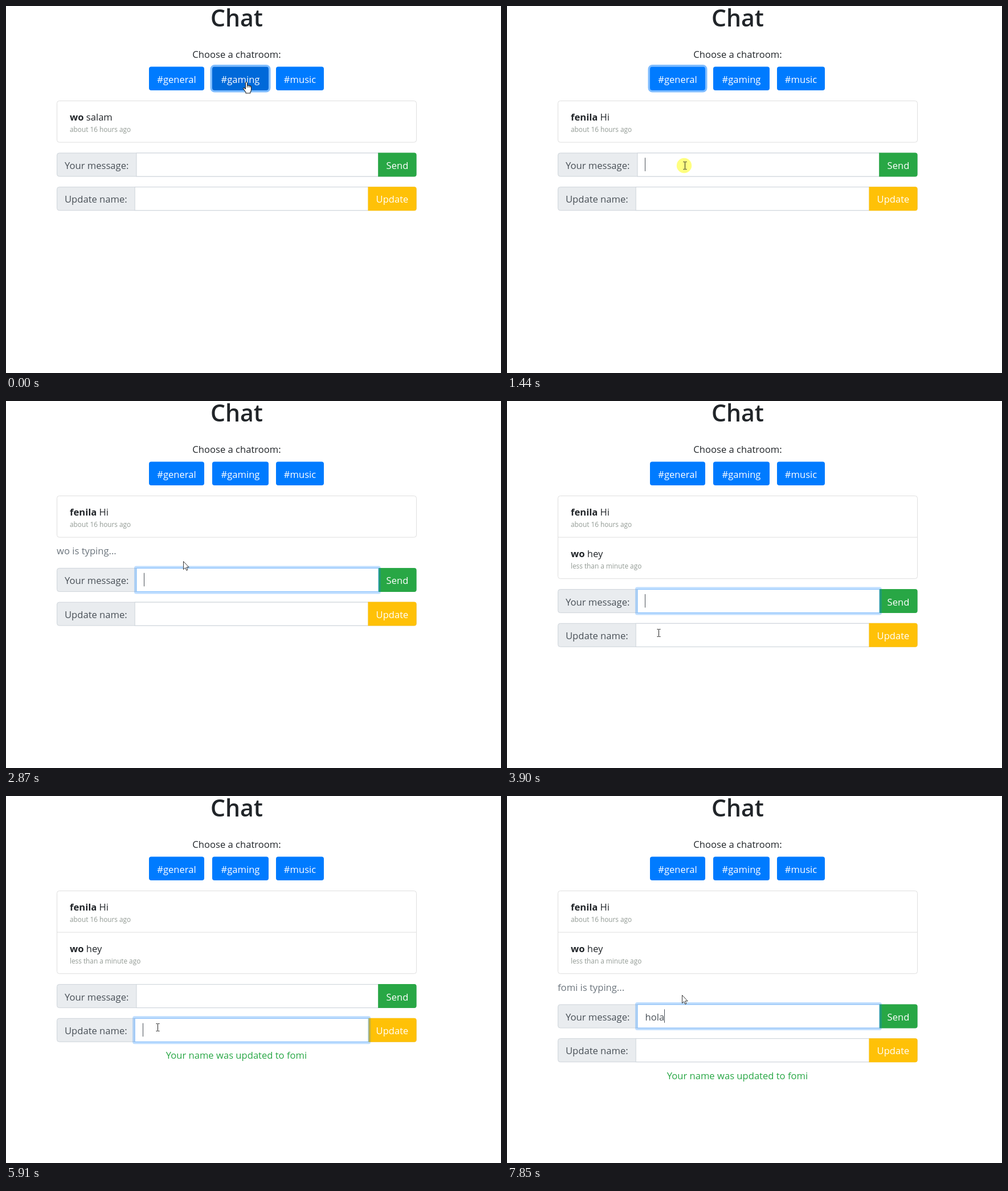
Recreate the animation shown at these times as an HTML page. Size 869 by 644 pixels, loop 8000 ms.

```html
<!DOCTYPE html>
<html lang="en">
<head>
<meta charset="utf-8">
<title>Chat</title>
<style>
  html, body { margin: 0; width: 100%; height: 100%; overflow: hidden; background: #fff; }
  svg { display: block; width: 869px; height: 644px; }
  text { font: 16.6px "Open Sans", "Noto Sans", sans-serif; fill: #212529; white-space: pre; }
  .mid { text-anchor: middle; }
  .light { fill: #fff; }
  .field { fill: #495057; }
  .muted { fill: #6c757d; }
  .small { font-size: 11.8px; fill: #929a94; }
  .bold { font-weight: 700; }
  .title { font-size: 41px; font-weight: 600; }
  .ok { fill: #28a745; }
  .card { fill: #fff; stroke: #dfdfdf; }
  .group { fill: #e9ecef; stroke: #ced4da; }
  .input { fill: #fff; stroke: #ced4da; }
  .active { fill: #fff; stroke: #80bdff; }
  .glow { fill: none; stroke: #007bff; stroke-opacity: .25; stroke-width: 3.5; }
  .ring { fill: none; stroke: #80bdff; stroke-width: 3.5; }
</style>
</head>
<body>
<svg id="stage" viewBox="0 0 869 644"></svg>
<script>
const LOOP = 8000;
const people = { first: "wo", other: "fenila", renamed: "fomi" };

const rooms = [
  { label: "#general", x: 251, w: 97 },
  { label: "#gaming", x: 362, w: 99 },
  { label: "#music", x: 474, w: 84 },
];
const ROW_HEIGHT = 42;
const rows = {
  msg: { y: 257.5, base: 286, label: "Your message:", x: 228.5, end: 654.3, button: "Send", mid: 687, color: "#28a745" },
  name: { y: 317.2, base: 345.4, label: "Update name:", x: 225.7, end: 636.6, button: "Update", mid: 678, color: "#ffc107" },
};

const text = (x, y, cls, value, id = "") =>
  `<text x="${x}" y="${y}" class="${cls}" id="${id}">${value}</text>`;
const rect = (x, y, w, h, r, cls, extra = "") =>
  `<rect x="${x}" y="${y}" width="${w}" height="${h}" rx="${r}" class="${cls}" ${extra}/>`;

const roomButton = ({ label, x, w }, i) =>
  rect(x - 1.75, 104.85, w + 3.5, 45, 6, "ring", `id="ring${i}"`) +
  rect(x, 106.6, w, 41.5, 4, "", `id="room${i}"`) +
  text(x + w / 2, 135, "mid light", label);

const inputRow = (key) => {
  const { y, base, label, x, end, button, mid, color } = rows[key];
  const h = ROW_HEIGHT, w = end - x, left = end - 1.1;
  return rect(89.5, y + .5, 631, h - 1, 4, "group") +
    rect(x + .5, y + .5, w - 1, h - 1, 0, "input") +
    `<path fill="${color}" d="M${left} ${y}H716.6q4 0 4 4V${y + h - 4}q0 4 -4 4H${left}z"/>` +
    text(103, base, "field", label) + text(mid, base, "mid light", button) +
    `<g id="${key}Focus">` + rect(x + .5, y + .5, w - 1, h - 1, 0, "active") +
    rect(x - 1.75, y - 1.75, w + 3.5, h + 3.5, 1.75, "glow") + `</g>` +
    text(x + 14, base, "field", "", key + "Text") +
    rect(x + 14, y + 8.8, 1, 23.6, 0, "", `id="${key}Caret" fill="#495057"`);
};

const message = (y, id) => text(112, y, "", "", id) + text(112, y + 20, "small", "", id + "Age");

const pointers = {
  arrow: `<path d="M.5 .5V14.6L3.7 11.6L5.9 16.3L7.9 15.4L5.9 10.8H10.2Z" fill="#fff" stroke="#222" stroke-width=".9" stroke-linejoin="round"/>`,
  hand: `<path d="M-1.5 1.5Q0-1 1.5 1.5V7Q3 5.6 4.3 7Q5.8 6 6.8 7.5Q8.5 7 8.5 9V14Q8.5 16.5 6.8 18.5V20H-1V18.5L-5.2 12.5Q-6 10.5-4 10.5L-1.5 12.5Z" fill="#fff" stroke="#222" stroke-width="1.1" stroke-linejoin="round"/><path d="M1.5 7V10M4.3 7.3V10M6.8 8V10" stroke="#222" fill="none"/>`,
  beam: `<path d="M-3-6.5H-1Q0-6.5 0-5.5Q0-6.5 1-6.5H3M0-5.5V5.5M-3 6.5H-1Q0 6.5 0 5.5Q0 6.5 1 6.5H3" fill="none" stroke="#222"/>`,
};

stage.innerHTML =
  text(405, 35.5, "mid title", "Chat") +
  text(405, 91, "mid", "Choose a chatroom:") +
  rooms.map(roomButton).join("") +
  rect(89.5, 166.5, 631, 72.6, 4, "card", `id="card"`) +
  message(201, "one") +
  `<g id="second"><path d="M90 239.1H720" stroke="#dfdfdf"/>${message(273.6, "two")}</g>` +
  text(89, 269, "muted", "", "typing") +
  `<g id="form">${inputRow("msg")}${inputRow("name")}${text(404.5, 388.5, "mid ok", "", "note")}</g>` +
  `<g id="pointer"><circle id="click" cx="-1.5" r="13.2" fill="#ffff80"/>` +
  Object.entries(pointers).map(([k, d]) => `<g id="${k}">${d}</g>`).join("") + `</g>`;

const $ = (id) => document.getElementById(id);
const show = (id, on) => $(id).setAttribute("opacity", +on);
const said = (who, what) => `<tspan class="bold">${who}</tspan> ${what}`;

const initial = {
  hover: 1, ring: 1, ringLevel: 1, joined: false, sent: false, typist: "",
  msg: "", name: "", focus: "", level: 0, caret: "", note: false, click: false,
};

// Each step holds until the next one.
const steps = [
  [270, { hover: 0, click: true }],
  [340, { ring: 0, joined: true, click: false }],
  [690, { hover: -1 }],
  [1440, { click: true, caret: "msg" }],
  [1510, { ringLevel: .5, focus: "msg", level: .5 }],
  [1580, { ringLevel: 0, level: 1, click: false }],
  [1930, { msg: "h" }],
  [2270, { msg: "he", typist: people.first }],
  [2410, { msg: "hey" }],
  [2810, { msg: "" }],
  [2880, { sent: true, typist: "" }],
  [4030, { click: true, focus: "name", level: .5, caret: "name" }],
  [4170, { click: false, level: 1 }],
  ...[4430, 4500, 4700, 4830].map((t, i) => [t, { name: people.renamed.slice(0, i + 1) }]),
  [5290, { name: "" }],
  [5360, { note: true }],
  [6450, { click: true, focus: "msg", level: .5, caret: "msg" }],
  [6590, { click: false, level: 1 }],
  [7060, { msg: "h" }],
  [7190, { msg: "ho" }],
  [7390, { typist: people.renamed }],
  [7520, { msg: "hol" }],
  [7850, { msg: "hola" }],
];

const path = [
  [0, 422, 133, "hand"], [200, 376, 129, "hand"], [270, 316, 124, "hand"], [340, 313, 123, "hand"],
  [550, 313, 127, "hand"], [620, 314, 138, "hand"], [690, 316, 160, "arrow"], [760, 317, 185, "arrow"],
  [830, 318, 204, "arrow"], [900, 316, 238, "arrow"], [970, 312.5, 263, "beam"],
  [1040, 312.5, 269, "beam"], [1110, 312.5, 276, "beam"], [1180, 312.5, 280, "beam"],
  [2270, 311, 281, "arrow"],
  [3490, 309, 290, "arrow"], [3560, 301, 320, "arrow"], [3640, 290, 356, "beam"], [3700, 279, 398, "beam"],
  [3770, 271, 418, "beam"], [3840, 267, 411, "beam"], [3900, 266.5, 407, "beam"], [4030, 266.5, 406, "beam"],
  [5980, 268, 403, "beam"], [6050, 275, 393, "beam"], [6120, 285, 381, "arrow"], [6190, 295, 368, "beam"],
  [6260, 302, 358, "beam"], [6330, 306, 352, "beam"], [6390, 307.5, 350, "beam"],
  [7390, 307, 349, "arrow"],
];

function render(t) {
  const s = Object.assign({}, initial, ...steps.filter(([at]) => at <= t).map(([, patch]) => patch));
  const [, px, py, kind] = path.filter(([at]) => at <= t).pop();

  rooms.forEach((_, i) => {
    $("room" + i).setAttribute("fill", s.hover === i ? "#0069d9" : "#007bff");
    show("ring" + i, s.ring === i ? s.ringLevel : 0);
  });

  $("one").innerHTML = s.joined ? said(people.other, "Hi") : said(people.first, "salam");
  $("oneAge").textContent = "about 16 hours ago";
  $("two").innerHTML = said(people.first, "hey");
  $("twoAge").textContent = "less than a minute ago";
  show("second", s.sent);

  const listShift = s.sent ? 72.6 : 0;
  const formShift = listShift + (s.typist ? 35.4 : 0);
  $("card").setAttribute("height", 72.6 + listShift);
  $("typing").textContent = s.typist && `${s.typist} is typing...`;
  $("typing").setAttribute("y", 269 + listShift);
  $("form").setAttribute("transform", `translate(0 ${formShift})`);

  for (const key in rows) {
    const field = $(key + "Text");
    field.textContent = s[key];
    show(key + "Focus", s.focus === key ? s.level : 0);
    show(key + "Caret", s.caret === key);
    $(key + "Caret").setAttribute("x", Math.round(rows[key].x + 13.9 + (s[key] ? field.getComputedTextLength() : 0)));
  }
  $("note").textContent = s.note ? `Your name was updated to ${people.renamed}` : "";

  $("pointer").setAttribute("transform", `translate(${px} ${py})`);
  for (const k in pointers) show(k, k === kind);
  show("click", s.click);
}

const start = performance.now();
function tick() {
  render((performance.now() - start) % LOOP);
  requestAnimationFrame(tick);
}
tick();
</script>
</body>
</html>
```
